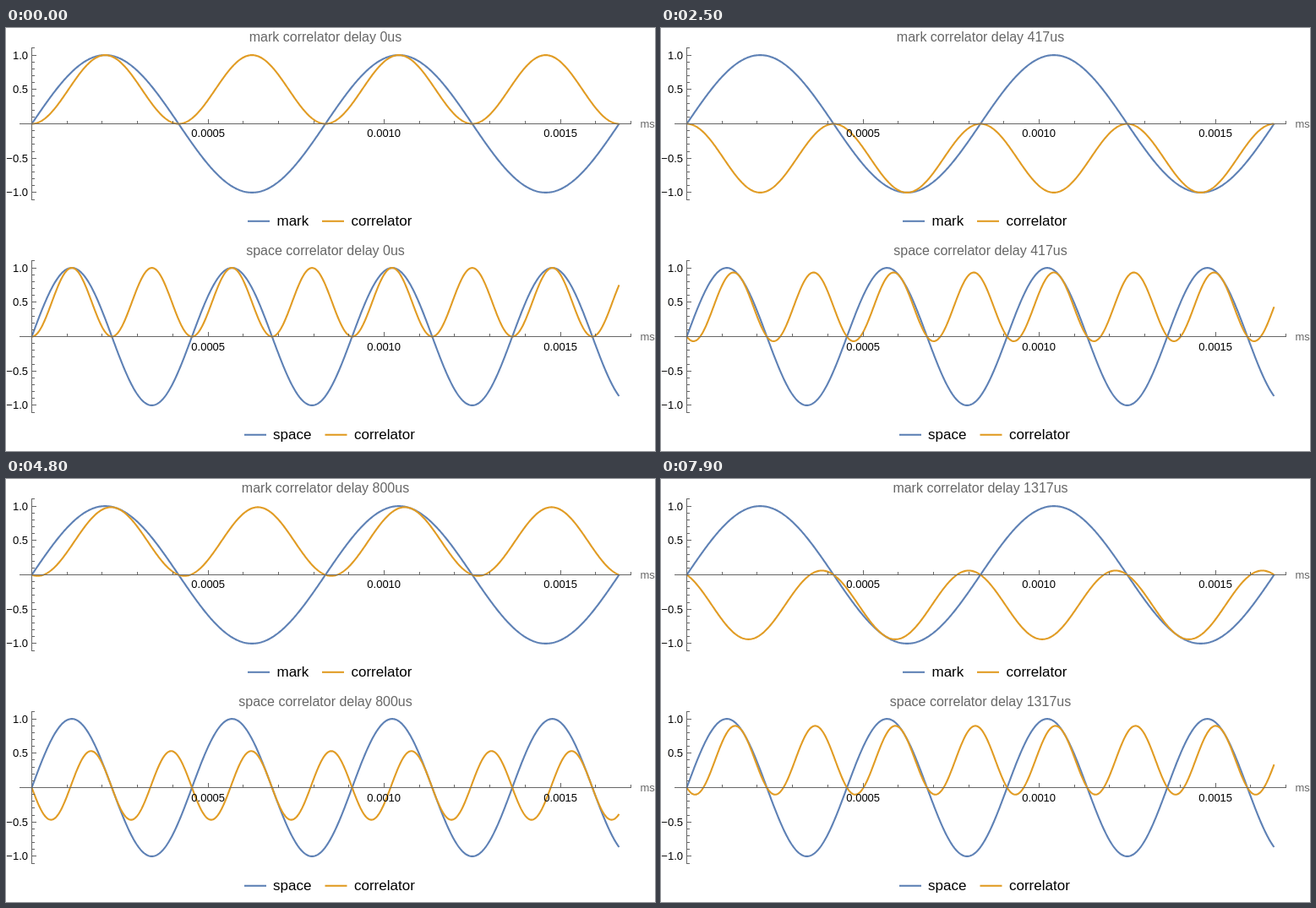
Write an HTML page with a canvas that moves like this. It is 768 px wide and 501 px high and loops after 8 s.

```html
<!DOCTYPE html>
<html lang="en">
<head>
<meta charset="utf-8">
<title>Correlator delay</title>
<style>
html, body { margin: 0; width: 768px; height: 501px; overflow: hidden; background: #fff; }
canvas { display: block; }
</style>
</head>
<body>
<canvas id="stage" width="768" height="501"></canvas>
<script>
const ctx = document.getElementById('stage').getContext('2d');
const BLUE = '#5e81b5', ORANGE = '#e19c24', GREY = '#666', BLACK = '#000';
const X0 = 30.5, X_SCALE = 417000, AMP = 81.4, END = 1 / 600;
const STEP = 100, STEPS = 80;

const plots = [
  { name: 'mark', freq: 1200, axis: 113.5, textTop: 0, legend: [286, 320.5, 374, 408.5] },
  { name: 'space', freq: 2200, axis: 365.5, textTop: 253, legend: [282, 316, 377.5, 412] }
];

function text(str, x, y, size, color, align = 'left') {
  ctx.font = `${size}px "Liberation Sans", Arial, sans-serif`;
  ctx.fillStyle = color;
  ctx.textAlign = align;
  ctx.fillText(str, x, y);
}

function line(x1, y1, x2, y2, color = GREY, width = 1) {
  ctx.strokeStyle = color;
  ctx.lineWidth = width;
  ctx.beginPath();
  ctx.moveTo(x1, y1);
  ctx.lineTo(x2, y2);
  ctx.stroke();
}

function curve(fn, axis, color) {
  ctx.strokeStyle = color;
  ctx.lineWidth = 2.1;
  ctx.lineJoin = 'round';
  ctx.beginPath();
  for (let i = 0; i <= 700; i++) {
    const t = END * i / 700;
    ctx.lineTo(X0 + t * X_SCALE, axis - AMP * fn(t));
  }
  ctx.stroke();
}

const crisp = v => Math.floor(v) + 0.5;

function drawAxes({ axis, textTop }) {
  line(16, axis, 740, axis);
  line(X0, axis - 90.5, X0, axis + 90.5);
  for (let i = 1; i <= 17; i++) {
    const x = crisp(X0 + i * X_SCALE / 1e4), major = i % 5 === 0;
    line(x, axis, x, axis - (major ? 5.5 : 3.5));
    if (major) text((i / 1e4).toFixed(4), x - 0.3, textTop + 129, 13, BLACK, 'center');
  }
  for (let i = -11; i <= 11; i++) {
    if (!i) continue;
    const y = crisp(axis - i * AMP / 10), major = i % 5 === 0;
    line(X0, y, X0 + (major ? 5.5 : 3.5), y);
    if (major) {
      const label = (i < 0 ? '\u2212' : '') + Math.abs(i / 10).toFixed(1);
      text(label, 26, y + 4.5, 13, BLACK, 'right');
    }
  }
  text('ms', 750.5, axis + 4.5, 13, GREY);
}

function drawLegend({ name, textTop, legend: [line1, text1, line2, text2] }) {
  const y = textTop + 228.8;
  line(line1, y, line1 + 26, y, BLUE, 2.1);
  line(line2, y, line2 + 26, y, ORANGE, 2.1);
  text(name, text1, textTop + 234, 17, BLACK);
  text('correlator', text2, textTop + 234, 17, BLACK);
}

function drawPlot(plot, delay) {
  const w = 2 * Math.PI * plot.freq;
  const signal = t => Math.sin(w * t);
  curve(signal, plot.axis, BLUE);
  curve(t => signal(t) * signal(t + delay), plot.axis, ORANGE);
  drawAxes(plot);
  drawLegend(plot);
  const title = `${plot.name} correlator delay ${Math.round(delay * 1e6)}us`;
  text(title, 378, plot.textTop + 16, 16, GREY, 'center');
}

function render() {
  const step = Math.floor(performance.now() / STEP) % STEPS;
  ctx.fillStyle = '#fff';
  ctx.fillRect(0, 0, 768, 501);
  for (const plot of plots) drawPlot(plot, step / 60000);
  requestAnimationFrame(render);
}
render();
</script>
</body>
</html>
```
